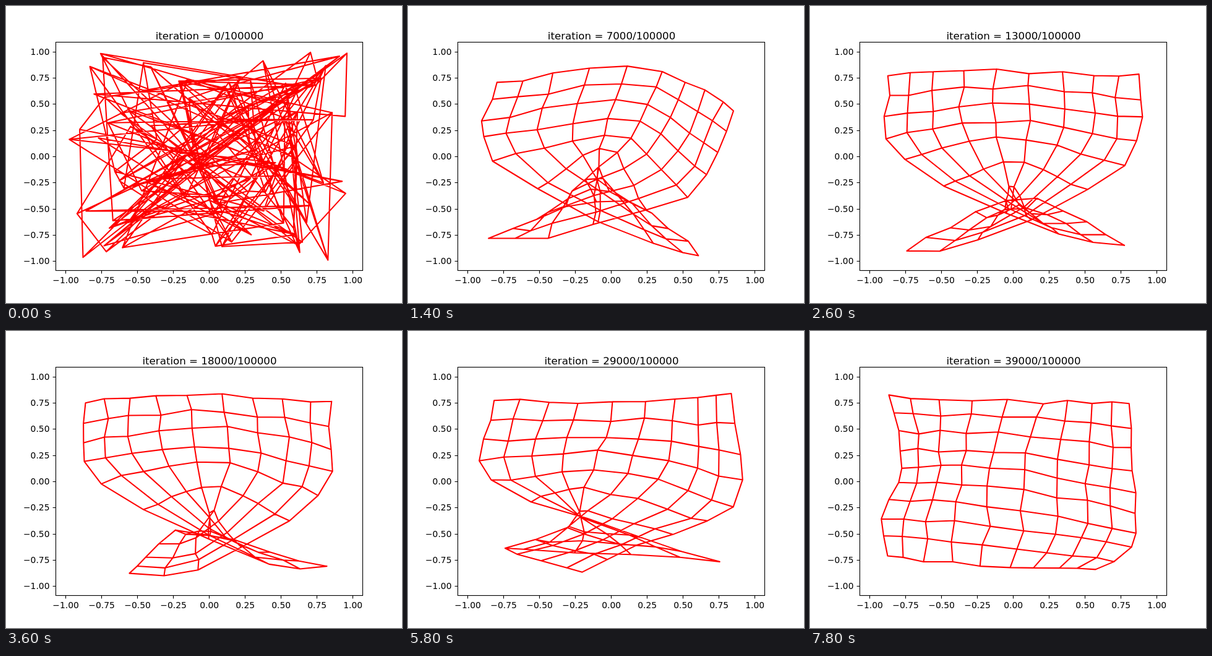
An HTML page with a canvas for the animation above (8000 ms loop, 640 by 480 pixels).

```html
<!DOCTYPE html>
<html lang="en">
<head>
<meta charset="utf-8">
<title>Self-organizing map</title>
<style>
  html, body { margin: 0; width: 100%; height: 100%; overflow: hidden; background: #fff; }
  canvas { display: block; }
</style>
</head>
<body>
<canvas id="stage" width="640" height="480"></canvas>
<script>
const ctx = document.getElementById('stage').getContext('2d');
const SIZE = 10, STEPS = 40, STEP_MS = 200;
const JITTER = 4;          // random unrest of each node, in pixels
const CROWDING = 0.35;     // how much columns gather at the sides
const KEY_ROWS = [0, 4, 7, 9], KEY_COLS = [0, 4.5, 9];
const MINUS = '\u2212';

const toX = v => 328.6 + 232 * v;
const toY = v => 243 - 169.2 * v;
const mix = (a, b, t) => a + (b - a) * t;

function seededRandom(seed) {
  return () => (seed = (seed * 48271) % 2147483647) / 2147483647;
}

// Smooth curve through values at the given knots.
function curveAt(knots, values, u) {
  const last = knots.length - 1;
  const slope = i => {
    const a = Math.max(i - 1, 0), b = Math.min(i + 1, last);
    return (values[b] - values[a]) / (knots[b] - knots[a]);
  };
  let i = 0;
  while (i < last - 1 && u > knots[i + 1]) i++;
  const span = knots[i + 1] - knots[i], t = (u - knots[i]) / span, s = 1 - t;
  return s * s * (1 + 2 * t) * values[i] + t * t * (3 - 2 * t) * values[i + 1]
    + span * t * s * (s * slope(i) - t * slope(i + 1));
}

const makeNodes = place => Array.from({ length: SIZE * SIZE },
  (_, n) => place(Math.floor(n / SIZE), n % SIZE));

// Bends the sheet through the left, middle and right points of its key rows.
function bentSheet(...keyRows) {
  return makeNodes((row, col) => {
    const across = col - CROWDING * Math.sin(2 * Math.PI * col / (SIZE - 1));
    return [0, 1].map(axis => curveAt(KEY_ROWS, keyRows.map(points =>
      curveAt(KEY_COLS, points.map(point => point[axis]), across)), row));
  });
}

const random = seededRandom(4711);
const scattered = makeNodes(() => [toX(random() * 1.96 - 0.98), toY(random() * 2 - 1)]);

const poses = [
  { step: 0, mesh: scattered },
  { step: 7, mesh: bentSheet(
    [[144, 123], [384, 101], [530, 168]],
    [[139, 250], [339, 208], [449, 306]],
    [[397, 385], [300, 275], [223, 372]],
    [[473, 400], [330, 312], [134, 374]]) },
  { step: 13, mesh: bentSheet(
    [[125, 111], [328, 105], [531, 113]],
    [[151, 250], [326, 213], [508, 255]],
    [[403, 370], [330, 322], [273, 381]],
    [[507, 385], [340, 310], [159, 394]]) },
  { step: 23, mesh: bentSheet(
    [[134, 121], [316, 99], [518, 117]],
    [[152, 237], [345, 215], [505, 272]],
    [[442, 376], [315, 320], [342, 389]],
    [[525, 377], [240, 335], [240, 396]]) },
  { step: 29, mesh: bentSheet(
    [[141, 112], [361, 117], [523, 105]],
    [[135, 242], [325, 225], [525, 283]],
    [[380, 333], [252, 320], [368, 347]],
    [[503, 370], [165, 352], [278, 390]]) },
  { step: 33, mesh: bentSheet(
    [[145, 92], [371, 101], [533, 106]],
    [[146, 253], [337, 228], [510, 276]],
    [[345, 330], [290, 318], [372, 334]],
    [[497, 381], [200, 378], [240, 378]]) },
  { step: 39, mesh: bentSheet(
    [[125, 106], [350, 113], [514, 118]],
    [[149, 220], [317, 223], [524, 261]],
    [[118, 300], [315, 316], [517, 350]],
    [[122, 366], [297, 378], [461, 388]]) }
];

function meshAt(step) {
  if (step === 0) return scattered;
  const index = poses.findIndex(pose => pose.step >= step);
  const from = poses[index - 1], to = poses[index];
  const t = (step - from.step) / (to.step - from.step);
  // The scattered start collapses almost at once; later changes are gradual.
  const progress = from.step === 0 ? 1 - 0.3 * (1 - t) ** 1.5 : t;
  const noise = seededRandom(step * 104729);
  return to.mesh.map((node, n) => node.map((value, axis) =>
    mix(from.mesh[n][axis], value, progress) + JITTER * (2 * noise() - 1)));
}

function drawMesh(mesh) {
  ctx.strokeStyle = '#f00';
  ctx.lineWidth = 2.08;
  ctx.lineCap = 'round';
  ctx.beginPath();
  mesh.forEach((node, n) => {
    const right = n % SIZE < SIZE - 1 && mesh[n + 1];
    const below = mesh[n + SIZE];
    for (const neighbour of [right, below]) {
      if (!neighbour) continue;
      ctx.moveTo(...node);
      ctx.lineTo(...neighbour);
    }
  });
  ctx.stroke();
}

function drawAxes() {
  ctx.strokeStyle = ctx.fillStyle = '#000';
  ctx.lineWidth = 1.11;
  ctx.lineCap = 'butt';
  ctx.font = '13.89px "DejaVu Sans", sans-serif';
  ctx.strokeRect(80.5, 58.5, 496, 369);
  ctx.beginPath();
  for (let value = -1; value <= 1; value += 0.25) {
    const label = (value < 0 ? MINUS : '') + Math.abs(value).toFixed(2);
    const x = Math.floor(toX(value)) + 0.5, y = Math.round(toY(value)) + 0.5;
    ctx.moveTo(x, 427.5);
    ctx.lineTo(x, 432.4);
    ctx.moveTo(80.5, y);
    ctx.lineTo(75.6, y);
    ctx.textAlign = 'center';
    ctx.fillText(label, toX(value), 448);
    ctx.textAlign = 'right';
    ctx.fillText(label, 70.5, Math.round(toY(value)) + 5);
  }
  ctx.stroke();
}

function drawTitle(step) {
  ctx.font = '16.67px "DejaVu Sans", sans-serif';
  ctx.textAlign = 'center';
  ctx.fillText(`iteration = ${step * 1000}/100000`, 329, 54);
}

function render(now) {
  const step = Math.floor(now / STEP_MS) % STEPS;
  ctx.fillStyle = '#fff';
  ctx.fillRect(0, 0, 640, 480);
  drawMesh(meshAt(step));
  drawAxes();
  drawTitle(step);
  requestAnimationFrame(render);
}

render(performance.now());
</script>
</body>
</html>
```
